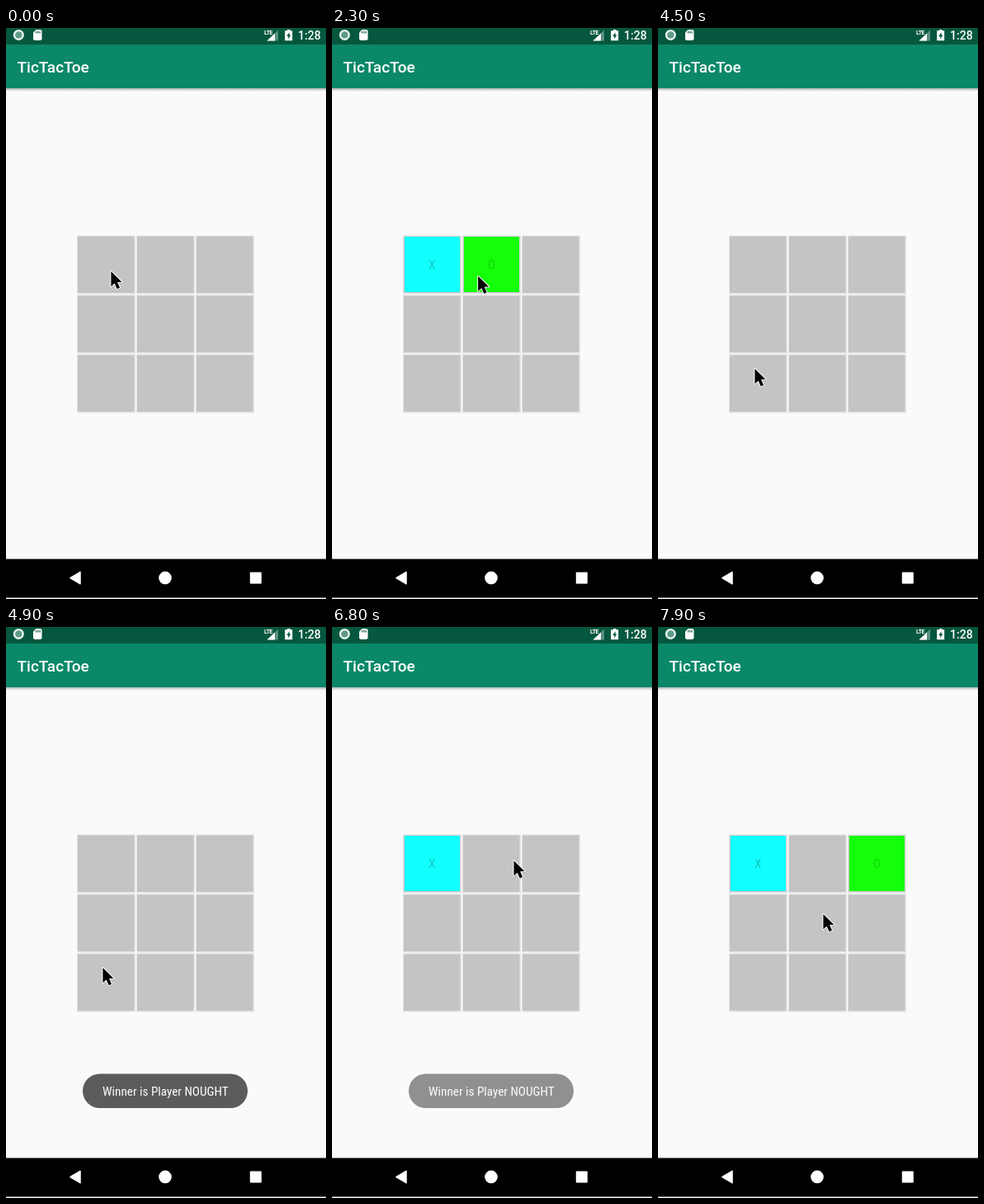
Animation, 388 px wide and 692 px high, one loop 8 s. Source, as an HTML page:

```html
<!DOCTYPE html>
<html lang="en">
<head>
<meta charset="utf-8">
<title>TicTacToe</title>
<style>
  html, body { margin: 0; width: 100%; height: 100%; overflow: hidden; background: #fafafa; }
  svg { display: block; width: 388px; height: 692px; }
  text { font-family: Roboto, sans-serif; }
  .mark, #msg { font-family: "Roboto Condensed", Roboto, sans-serif; font-stretch: condensed; }
  .mark { font-size: 14px; font-weight: 300; text-anchor: middle; }
  #msg { font-size: 15.2px; }
</style>
</head>
<body>
<svg viewBox="0 0 388 692">
  <defs>
    <linearGradient id="shade" x2="0" y2="1">
      <stop offset="0" stop-color="#000" stop-opacity=".28"/>
      <stop offset="1" stop-color="#000" stop-opacity="0"/>
    </linearGradient>
  </defs>
  <rect width="388" height="692" fill="#fafafa"/>

  <!-- app bar -->
  <rect y="73" width="388" height="4" fill="url(#shade)"/>
  <rect width="388" height="73" fill="#0a8868"/>
  <rect width="388" height="20" fill="#06573f"/>
  <text x="13.5" y="53.5" font-size="19" font-weight="500" fill="#fff">TicTacToe</text>

  <!-- status icons -->
  <circle cx="15.3" cy="8.4" r="5.3" fill="#5f9a88" stroke="#e9f3f0" stroke-width="2.4"/>
  <path d="M36.5 2H42L43.500 3.500V13.500L42 15H34.500L33 13.500V5.500Z" fill="#fff"/>
  <path d="M36.700 4v2.600M38.900 4v2.600M41.100 4v2.600" stroke="#06573f" stroke-width="1.100"/>
  <path d="M330 2.500V15.500H316.500Z" fill="#fff" opacity=".35"/>
  <path d="M326 6.400V15.500H316.500Z" fill="#fff"/>
  <text x="313" y="8" font-size="7" font-weight="700" fill="#fff" stroke="#06573f" paint-order="stroke" letter-spacing="-.4">LTE</text>
  <path d="M341 2h3.600v1.300H347.200V15.200H338.200V3.300H341Z" fill="#fff"/>
  <path d="M343.600 5.200L340.200 10H342.200V13.400L345.400 8.500H343.600Z" fill="#06573f"/>
  <text x="354" y="14" font-size="14" font-weight="500" fill="#fff">1:28</text>

  <g id="board"></g>

  <g id="toast">
    <rect x="93" y="541.500" width="200" height="41.500" rx="20.750" fill="#555"/>
    <text id="msg" x="117" y="568" fill="#fff">Winner is Player NOUGHT</text>
  </g>

  <!-- navigation bar -->
  <rect y="643.500" width="388" height="47" fill="#000"/>
  <path d="M78 666.500L90 659.300V673.700Z" fill="#fff" stroke="#fff" stroke-width="1.500" stroke-linejoin="round"/>
  <circle cx="193" cy="666.400" r="7.800" fill="#fff"/>
  <rect x="295.800" y="659.500" width="14" height="14" rx="1" fill="#fff"/>

  <g id="cursor">
    <path d="M1.500 3V21L5.600 17.300L8.600 24L12 22.500L9 15.900L14.500 15.600Z" opacity=".16"/>
    <path d="M.700 1V19.200L4.900 15.400L7.900 22.300L11.300 20.800L8.300 14.100L13.700 13.700Z"
          stroke="#fff" stroke-width="2" stroke-linejoin="round" paint-order="stroke"/>
  </g>
</svg>
<script>
const LOOP = 8000, STEP = 100;
const LEFT = 87, TOP = 252, PITCH = 72;
const FADE = 500, TOAST = 2000;
const $ = id => document.getElementById(id);
const clamp = u => Math.min(1, Math.max(0, u));

// Where the pointer rests, when it gets there and when it taps
const stops = [
  { x: 127, y: 294, arrive: 0 },
  { x: 128, y: 287, arrive: 900, tap: 1100 },
  { x: 203, y: 285, arrive: 1800, tap: 2100 },
  { x: 122, y: 339, arrive: 2700, tap: 2900 },
  { x: 186, y: 347, arrive: 3400, tap: 3600 },
  { x: 117, y: 412, arrive: 4300, tap: 4500 },
  { x: 133, y: 282, arrive: 5800, tap: 6200 },
  { x: 257, y: 288, arrive: 7000, tap: 7200 },
  { x: 200, y: 347, arrive: 7900 }
];
const looks = { X: ['#12ffff', '#10aaa0'], O: ['#14ff08', '#12bd10'] };

function add(name, attrs) {
  const el = document.createElementNS('http://www.w3.org/2000/svg', name);
  for (const k in attrs) el.setAttribute(k, attrs[k]);
  return $('board').appendChild(el);
}

const square = (x, y, size, fill) => add('rect', { x, y, width: size, height: size, fill });

const cells = Array.from({ length: 9 }, (_, i) => {
  const x = LEFT + i % 3 * PITCH, y = TOP + Math.floor(i / 3) * PITCH;
  square(x - 1, y - .5, 71, '#e4e4e4');
  square(x, y + .5, 68.5, '#c4c4c4');
  return {
    tint: square(x + 1, y + 1, 67, 'none'),
    label: add('text', { x: x + 34.3, y: y + 39.7, class: 'mark' })
  };
});

const cellAt = ({ x, y }) =>
  Math.floor((x - LEFT) / PITCH) + 3 * Math.floor((y - TOP) / PITCH);

// Rows, columns and diagonals
const lines = [0, 1, 2].flatMap(i => [[3 * i, 3 * i + 1, 3 * i + 2], [i, i + 3, i + 6]]);
lines.push([0, 4, 8], [2, 4, 6]);

// Replays the taps up to time t; a win clears the board
function gameAt(t) {
  let marks = [], turn = 'X', won = Infinity;
  for (const stop of stops) {
    if (!(stop.tap <= t)) continue;
    marks[cellAt(stop)] = turn;
    if (lines.some(line => line.every(c => marks[c] === turn))) {
      marks = [];
      turn = 'X';
      won = stop.tap;
    } else {
      turn = turn === 'X' ? 'O' : 'X';
    }
  }
  return { marks, won };
}

function toastAt(age) {
  const enter = clamp(age / FADE), leave = clamp((age - TOAST) / FADE);
  return 1 - (1 - enter) ** 2 - leave ** 2;
}

// Longer glides take longer and bow slightly upwards
function pointerAt(t) {
  const next = stops.findIndex(s => s.arrive > t);
  if (next < 0) return stops[stops.length - 1];
  const a = stops[next - 1], b = stops[next];
  const dx = b.x - a.x, dy = b.y - a.y;
  const time = 300 + 3 * Math.hypot(dx, dy);
  const u = clamp(1 - (b.arrive - t) / time);
  const bow = .04 * Math.abs(dx) * Math.sin(Math.PI * u);
  return { x: a.x + dx * u, y: a.y + dy * u - bow };
}

function draw(t) {
  const { marks, won } = gameAt(t);
  cells.forEach(({ tint, label }, i) => {
    const mark = marks[i] || '';
    const [fill, ink] = looks[mark] || ['none', 'none'];
    tint.setAttribute('fill', fill);
    label.setAttribute('fill', ink);
    label.textContent = mark;
  });
  const { x, y } = pointerAt(t);
  $('toast').setAttribute('opacity', won <= t ? toastAt(t - won) : 0);
  $('cursor').setAttribute('transform', `translate(${x - .3} ${y})`);
}

const start = performance.now();
function tick() {
  const t = (performance.now() - start) % LOOP;
  draw(Math.floor(t / STEP) * STEP);
  requestAnimationFrame(tick);
}
tick();
</script>
</body>
</html>
```
